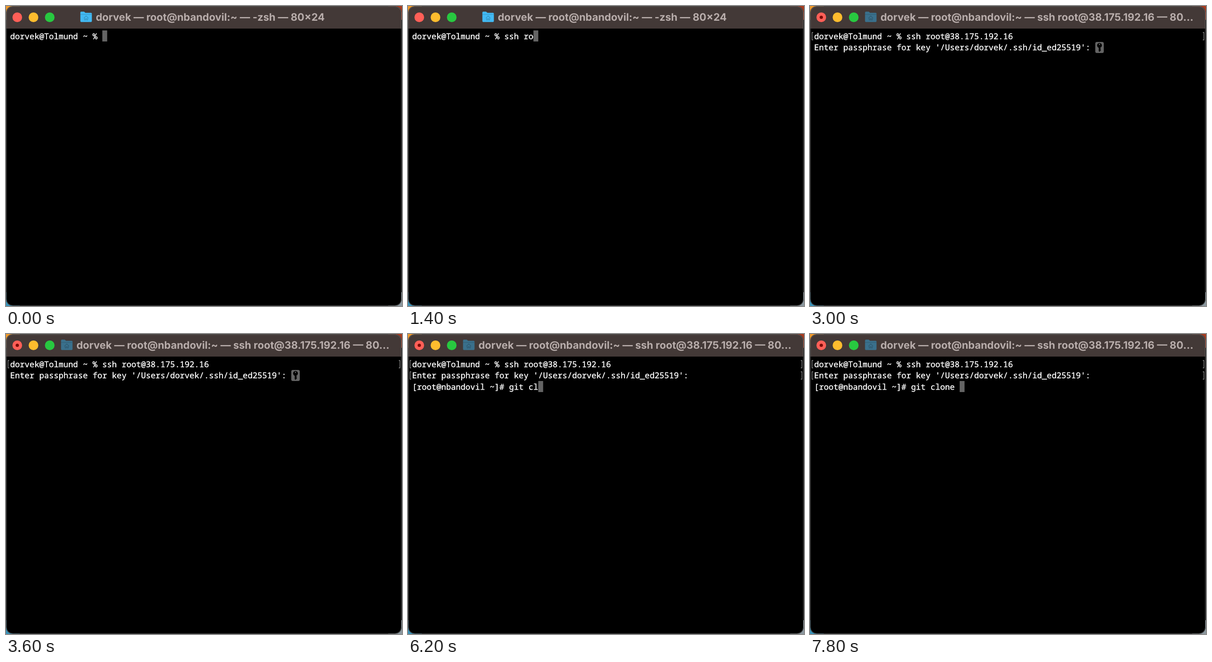
An HTML page for the animation above (8000 ms loop, 860x651 px).

```html
<!DOCTYPE html>
<html lang="en">
<head>
<meta charset="utf-8">
<title>Terminal</title>
<style>
  html, body { margin: 0; width: 100%; height: 100%; overflow: hidden; background: #000; }
  svg { display: block; width: 860px; height: 651px; }
  text { white-space: pre; text-rendering: geometricPrecision; }
  .line { font: 17.56px "Noto Sans Mono", "DejaVu Sans Mono", monospace; fill: #fff; stroke: #fff; stroke-width: .4; }
  #title { font: 700 22.4px Inter, sans-serif; fill: #b8adab; }
  #bar { fill: #433937; }
  .mark { fill: none; stroke: #8c8c8c; stroke-width: 1.3; }
  .blurred #bar { fill: #3a2d2b; }
  .blurred #title { fill: #70635f; }
  .blurred .light { fill: #6b605e; }
  .blurred #dot { fill: #3a2d2b; }
  #folder { color: #42b9f3; }
  .ssh #folder { color: #3a708c; }
  .blurred #folder { color: #665a58; }
</style>
</head>
<body>
<svg id="stage" viewBox="0 0 860 651">
  <rect width="30" height="30" fill="#f09a2c"/>
  <rect x="830" width="30" height="30" fill="#a63c20"/>
  <rect y="621" width="30" height="30" fill="#3c93b8"/>
  <rect x="830" y="621" width="30" height="30" fill="#8b989f"/>
  <clipPath id="frame"><rect x="0.5" y="0.5" width="858.5" height="650" rx="14"/></clipPath>
  <g clip-path="url(#frame)">
    <rect width="860" height="651"/>
    <rect id="bar" width="860" height="49"/>
  </g>
  <rect x="1" y="1" width="857.5" height="649" rx="14" fill="none" stroke="#777" stroke-opacity=".75"/>

  <circle class="light" cx="24.5" cy="24.5" r="10.5" fill="#ff5f57"/>
  <circle class="light" cx="59.7" cy="24.5" r="10.5" fill="#febc2e"/>
  <circle class="light" cx="95" cy="24.5" r="10.5" fill="#28c840"/>
  <circle id="dot" cx="24.5" cy="24.5" r="3.6" fill="#7c0c08"/>

  <g id="folder">
    <path d="M0 2Q0 0 2 0H8L11 2.5H23Q25 2.5 25 4.5V20.5Q25 22.5 23 22.5H2Q0 22.5 0 20.5Z" fill="currentColor"/>
    <path d="M0 6H25" stroke="#000" stroke-opacity=".2"/>
    <path d="M7.5 14L12.5 9L17.5 14M9 13V18H11.5V15H13.5V18H16V13" fill="none" stroke="#000" stroke-opacity=".2" stroke-width="1.2"/>
  </g>
  <text id="title" y="31.5"></text>

  <rect id="cursor"/>
  <g id="key">
    <rect x="619.5" y="78" width="18.5" height="24" rx="3.5" fill="#646464"/>
    <circle cx="628.7" cy="85.5" r="5.2"/>
    <circle cx="628.7" cy="83.3" r="1.4" fill="#646464"/>
    <path d="M627 89H630.3V91.5L632 93L630.3 94.5L632 96L628.7 99.5L627 98Z"/>
  </g>
  <text class="line" x="9" y="71.7"></text>
  <text class="line" x="9" y="96.2"></text>
  <text class="line" x="9" y="120.7"></text>
  <path class="mark" d="M7 57.5H4.5V73.5H7M853 57.5H855.5V73.5H853"/>
  <path class="mark" d="M7 82H4.5V98H7M853 82H855.5V98H853"/>
</svg>
<script>
  const STEP = 200, LOOP = 8000, CELL = 10.536, ROW = 24.5;
  const user = "dorvek", host = "nbandovil", ip = "38.175.192.16";
  const prompt = `${user}@Tolmund ~ % `;
  const ask = `Enter passphrase for key '/Users/${user}/.ssh/id_ed25519': `;
  const remote = `[root@${host} ~]# `;
  const ssh = `ssh root@${ip}`, git = "git clone ";

  const byId = id => document.getElementById(id);
  const stage = byId("stage"), title = byId("title"), folder = byId("folder");
  const cursor = byId("cursor"), dot = byId("dot"), key = byId("key");
  const lines = stage.querySelectorAll(".line");
  const marks = stage.querySelectorAll(".mark");

  const show = (el, on) => el.setAttribute("visibility", on ? "visible" : "hidden");
  const put = (el, attrs) => {
    for (const name in attrs) el.setAttribute(name, attrs[name]);
  };

  // "ssh root" is typed by hand, then the address is pasted.
  const sshTyped = step => step < 10 ? ssh.slice(0, Math.max(0, step - 1)) : ssh;

  function screen(step) {
    const rows = [prompt + sshTyped(step)];
    if (step >= 12) rows.push(step >= 13 ? ask : "");
    if (step >= 23) rows.push(step >= 25 ? remote + git.slice(0, step - 25) : "");
    return rows;
  }

  function draw(step) {
    const connected = step >= 12;
    const blurred = step >= 35 && step < 38;
    const asking = step >= 13 && step < 23;
    const rows = screen(step);
    const last = rows.length - 1;

    stage.setAttribute("class", (connected ? "ssh" : "") + (blurred ? " blurred" : ""));
    title.textContent = `${user} — root@${host}:~ — ` +
      (connected ? `ssh root@${ip} — 80…` : "-zsh — 80×24");
    put(title, { x: connected ? 153 : 195 });
    put(folder, { transform: `translate(${connected ? 119.5 : 161.5} 12.3)` });
    show(dot, connected);
    show(key, asking);
    lines.forEach((line, i) => line.textContent = rows[i] || "");
    marks.forEach((mark, i) => show(mark, i < last));

    const inset = blurred ? 0.6 : 0;
    put(cursor, {
      x: 9 + rows[last].length * CELL + inset,
      y: 53 + last * ROW + inset,
      width: CELL - 2 * inset,
      height: 24 - 2 * inset,
      fill: blurred ? "none" : "#646464",
      stroke: blurred ? "#646464" : "none",
      "stroke-width": 1.2
    });
    show(cursor, !asking);
  }

  let shown = -1;
  const start = performance.now();
  function tick() {
    const step = Math.floor((performance.now() - start) % LOOP / STEP);
    if (step !== shown) draw(shown = step);
    requestAnimationFrame(tick);
  }
  tick();
</script>
</body>
</html>
```
